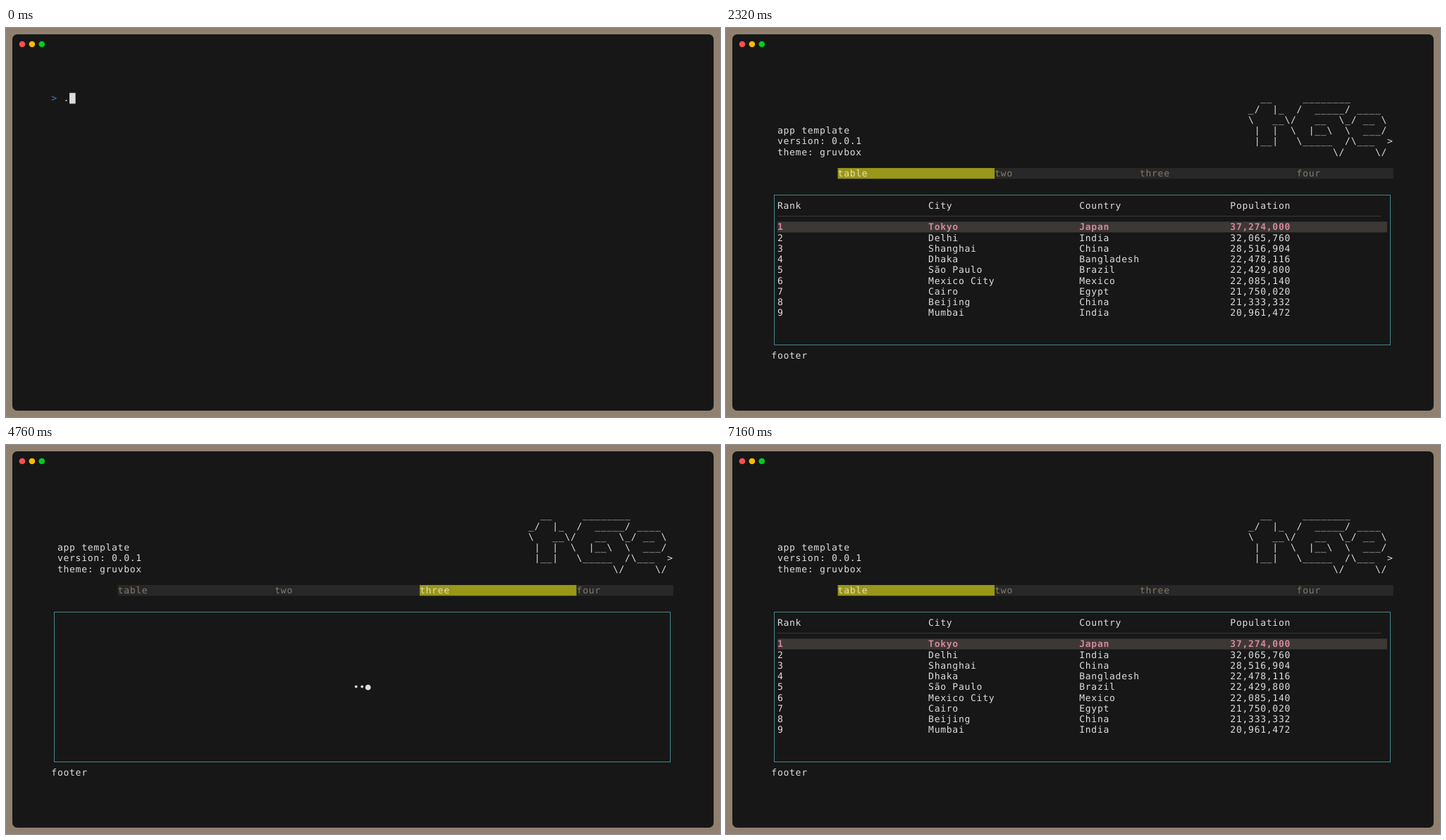
Recreate the animation shown at these times as an HTML page with a canvas. Size 1013 by 553 pixels, loop 8 s.

```html
<!DOCTYPE html>
<html lang="en">
<head>
<meta charset="utf-8">
<title>Terminal demo</title>
<style>
  html, body { margin: 0; width: 100%; height: 100%; overflow: hidden; background: #908070; }
  canvas { display: block; width: 1013px; height: 553px; }
</style>
</head>
<body>
<canvas id="stage"></canvas>
<script>
const WIDTH = 1013, HEIGHT = 553, LOOP = 8000, STEP = 40;
const CELL_W = 8.566, CELL_H = 15.25, LEFT = 64.35, TOP = 92.3;
const FONT = '13.05px "DejaVu Sans Mono", "DejaVu Sans", monospace';
const FG = '#dddddd';

const COMMAND = './dist/template -c table';
const LOGO = [
  '  __     ________',
  '_/  |_  /  _____/ ____',
  '\\   __\\/   __  \\_/ __ \\',
  ' |  |  \\  |__\\  \\  ___/',
  ' |__|   \\_____  /\\___  >',
  '              \\/     \\/'
];
const INFO = ['app template', 'version: 0.0.1', 'theme: gruvbox'];
const TABS = [['table', 11], ['two', 37], ['three', 61], ['four', 87]];
const TABS_END = 103;
const CITIES = `Rank|City|Country|Population
1|Tokyo|Japan|37,274,000
2|Delhi|India|32,065,760
3|Shanghai|China|28,516,904
4|Dhaka|Bangladesh|22,478,116
5|São Paulo|Brazil|22,429,800
6|Mexico City|Mexico|22,085,140
7|Cairo|Egypt|21,750,020
8|Beijing|China|21,333,332
9|Mumbai|India|20,961,472`.split('\n').map(line => line.split('|'));

const DOTS = { frames: [...'⣾⣽⣻⢿⡿⣟⣯⣷'], start: 2223.2, period: 99.8 };
const POINTS = { frames: ['∙∙∙', '●∙∙', '∙●∙', '∙∙●'], start: 2176.5, period: 142.86 };
const SHADES = [
  ['1'],
  ['01', '11', '10', '11'],
  ['10', '00', '01', '00'],
  ['1000', '0000', '0010', '0000']
];
const PULSE = { frames: SHADES, start: 2163, period: 125 };

// Time at which each tab opens
const VISITS = [[2320, 0], [3280, 1], [4320, 2], [5320, 3], [7160, 0]];

const canvas = document.getElementById('stage');
const ctx = canvas.getContext('2d');
const ratio = window.devicePixelRatio || 1;
canvas.width = WIDTH * ratio;
canvas.height = HEIGHT * ratio;
ctx.scale(ratio, ratio);
ctx.textRendering = 'geometricPrecision';

const colX = col => LEFT + col * CELL_W;
const rowY = row => TOP + row * CELL_H;

function fillCells(col, row, count, color) {
  ctx.fillStyle = color;
  ctx.fillRect(colX(col), rowY(row), count * CELL_W, CELL_H);
}

function print(text, col, row, color = FG, bold = false) {
  ctx.font = (bold ? 'bold ' : '') + FONT;
  ctx.fillStyle = color;
  [...text].forEach((char, i) => {
    if (char !== ' ') ctx.fillText(char, colX(col + i), rowY(row) + 12.15);
  });
}

function drawWindow() {
  ctx.fillStyle = '#908070';
  ctx.fillRect(0, 0, WIDTH, HEIGHT);
  ctx.fillStyle = '#171717';
  ctx.beginPath();
  ctx.roundRect(9, 9, 995, 535, 7);
  ctx.fill();
  ['#ff4f4d', '#febb00', '#00cc1d'].forEach((color, i) => {
    ctx.fillStyle = color;
    ctx.beginPath();
    ctx.arc(23 + i * 13.9, 23, 4.35, 0, Math.PI * 2);
    ctx.fill();
  });
}

function drawPrompt(t) {
  const typed = Math.max(1, 2 + Math.floor((t - 60) / 52.7));
  const text = COMMAND.slice(0, typed);
  print('>', 0, 0, '#3a6597', true);
  print(text, 2, 0);
  if (t < 1840) fillCells(2 + text.length, 0, 1, FG);
}

function drawTabs(active) {
  TABS.forEach(([label, col], i) => {
    const end = i + 1 < TABS.length ? TABS[i + 1][1] : TABS_END;
    const on = i === active;
    fillCells(col, 7, end - col, on ? '#98971a' : '#282828');
    print(label, col, 7, on ? '#ebdbb2' : '#847868');
  });
}

function drawTable() {
  ctx.fillStyle = '#3c3836';
  ctx.fillRect(colX(1), 267, 100 * CELL_W, 1);
  fillCells(1, 12, 101, '#3c3836');
  CITIES.forEach((cells, i) => {
    const row = i ? 11 + i : 10;
    const selected = i === 1;
    cells.forEach((cell, j) => print(cell, 1 + j * 25, row, selected ? '#d3869b' : FG, selected));
  });
}

function spinnerFrame({ frames, start, period }, t) {
  return frames[(Math.floor((t - start) / period) + 1) % frames.length];
}

function drawShade(pattern, col, row) {
  if (pattern.length === 1) return fillCells(col, row, 1, FG);
  const dot = WIDTH / 1400;
  ctx.fillStyle = FG;
  for (let y = 0; y < 21; y++) {
    const line = pattern[y % pattern.length];
    for (let x = 0; x < 12; x++) {
      if (line[x % line.length] === '1') {
        ctx.fillRect(colX(col) + x * dot, rowY(row) + y * dot, dot, dot);
      }
    }
  }
}

const PAGES = [
  drawTable,
  t => print(spinnerFrame(DOTS, t), 51, 16),
  t => print(spinnerFrame(POINTS, t), 50, 16),
  t => drawShade(spinnerFrame(PULSE, t), 51, 16)
];

function footerText(t) {
  if (t < 6345 || t >= 7160) return 'footer';
  return ':table'.slice(0, 1 + Math.floor((t - 6345) / 52.7));
}

function drawApp(t) {
  const tab = VISITS.filter(([time]) => time <= t).pop()[1];
  LOGO.forEach((line, i) => print(line, 79, i));
  INFO.forEach((line, i) => print(line, 1, 3 + i));
  drawTabs(tab);
  ctx.strokeStyle = '#458588';
  ctx.lineWidth = 1;
  ctx.strokeRect(68.5, 237.5, 874, 213);
  PAGES[tab](t);
  print(footerText(t), 0, 24);
}

function render(now) {
  const t = Math.floor((now % LOOP) / STEP) * STEP;
  drawWindow();
  if (t < 2280) drawPrompt(t);
  else if (t >= VISITS[0][0]) drawApp(t);
}

const origin = performance.now();
function loop() {
  render(performance.now() - origin);
  requestAnimationFrame(loop);
}
loop();
</script>
</body>
</html>
```
